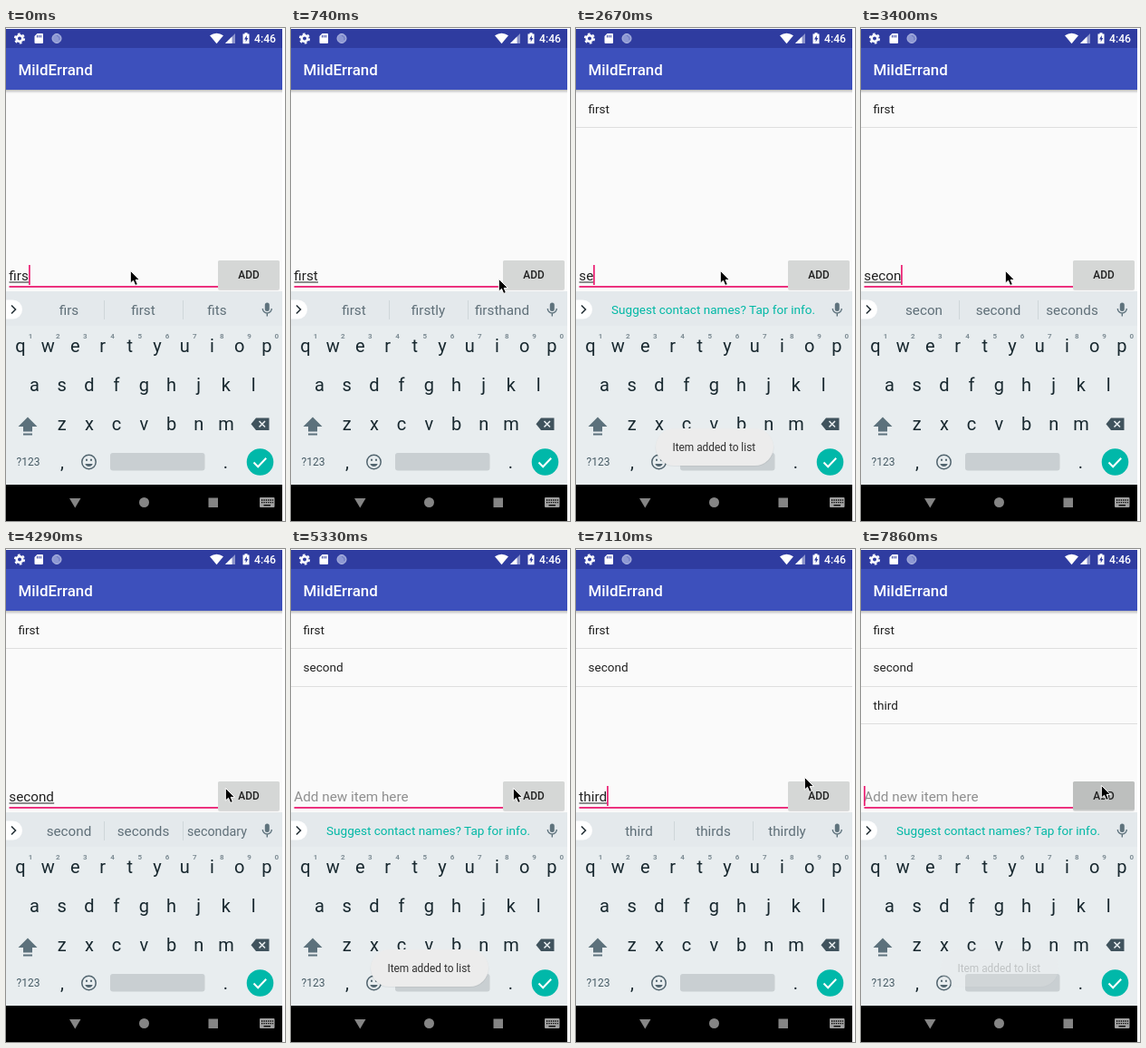
These frames come from a looping animation (308 by 543 pixels, 8 s). An HTML page:

```html
<!DOCTYPE html>
<html lang="en">
<head>
<meta charset="utf-8">
<title>Task list</title>
<style>
  html, body { margin: 0; width: 100%; height: 100%; overflow: hidden; background: #fff; }
  svg { display: block; font-family: Roboto, sans-serif; }
  .mid { text-anchor: middle; }
  .item { font-size: 13.55px; fill: #212121; }
  .field { font-size: 15.25px; }
  .word { font-size: 15.25px; fill: #5f6f78; text-anchor: middle; }
  .key { font-size: 20px; fill: #18282f; text-anchor: middle; }
  .digit { font-size: 8px; font-weight: 700; fill: #7d8c94; text-anchor: middle; }
</style>
</head>
<body>
<svg width="308" height="543" viewBox="0 0 308 543">
  <defs>
    <linearGradient id="shade" x2="0" y2="1">
      <stop offset="0" stop-color="#000" stop-opacity=".25"/>
      <stop offset="1" stop-color="#000" stop-opacity="0"/>
    </linearGradient>
  </defs>

  <!-- App and status bars -->
  <rect y="1" width="305" height="542" fill="#fafafa"/>
  <rect y="1" width="305" height="21" fill="#2f3ca0"/>
  <rect y="22" width="305" height="46" fill="#3d50bc"/>
  <rect y="68" width="305" height="4" fill="url(#shade)"/>
  <text x="13.5" y="51.5" font-size="16.9" font-weight="500" fill="#fff">MildErrand</text>
  <g fill="#fff">
    <circle cx="15" cy="11.5" r="3.3" fill="none" stroke="#fff" stroke-width="2.6"/>
    <circle cx="15" cy="11.5" r="5.2" fill="none" stroke="#fff" stroke-width="1.8" stroke-dasharray="2.7 2.745"/>
    <path d="M34.5 6H40a1 1 0 0 1 1 1v9a1 1 0 0 1-1 1h-7.5a1 1 0 0 1-1-1V9z"/>
    <path d="M34.5 8v2.5M36.5 8v2.5M38.5 8v2.5" stroke="#2f3ca0"/>
    <circle cx="56" cy="11.5" r="5" fill="#8e99d3" stroke="#b3bbe3"/>
    <path d="M56 8.5a3.5 3.5 0 0 1 2.8 4.5" fill="none" stroke="#6b78c2"/>
    <path d="M225 8.3Q232.5 3.2 240 8.3L232.5 17.3z"/>
    <path d="M253 6V17H242z" opacity=".45"/>
    <path d="M249.5 9.5V17H242z"/>
    <path d="M263.5 5.2h3v1.2h2V17.2h-7V6.4h2z"/>
    <path d="M265.8 8l-2.8 4.5h1.7V15.5l2.6-4.5h-1.5z" fill="#2f3ca0"/>
    <text x="274" y="16" font-size="12.2" font-weight="500">4:46</text>
  </g>

  <g id="list"></g>

  <!-- Entry row -->
  <text id="hint" class="field" x="3.3" y="278" fill="#8f8f8f">Add new item here</text>
  <text id="entry" class="field" x="3.3" y="278" fill="#212121"></text>
  <rect id="underline" x="3.5" y="279.5" height="1" fill="#212121"/>
  <rect x="3.5" y="284" width="230.5" height="1.9" fill="#ec2a79"/>
  <rect id="caret" y="261" width="1.8" height="22" fill="#ec2a79"/>
  <rect x="234" y="257" width="68" height="32" rx="2" fill="#000" opacity=".13"/>
  <rect id="button" x="234" y="256" width="68" height="31.5" rx="1.5"/>
  <text class="mid" x="268" y="276" font-size="11.86" font-weight="500" fill="#202020">ADD</text>

  <!-- Keyboard -->
  <rect y="290" width="305" height="213" fill="#e8edef"/>
  <rect y="290" width="305" height="38" fill="#e4e9ec"/>
  <path d="M0 299.5H7.5a10.5 10.5 0 0 1 0 21H0z" fill="#fff"/>
  <path d="M6 305.5l4.5 4.5L6 314.5" fill="none" stroke="#263238" stroke-width="1.6"/>
  <g id="words">
    <path d="M108.5 300v21M195.5 300v21" stroke="#cfd6d9"/>
    <text class="word" x="69.5" y="316"></text>
    <text class="word" x="151.5" y="316"></text>
    <text class="word" x="233" y="316"></text>
  </g>
  <text id="offer" class="mid" x="151.5" y="315" font-size="13.55" fill="#00b8a5">Suggest contact names? Tap for info.</text>
  <rect x="285.8" y="302.5" width="5" height="9.5" rx="2.5" fill="#5f737d"/>
  <path d="M283.3 309a5 5 0 0 0 10 0M288.3 314v3.5" fill="none" stroke="#5f737d" stroke-width="1.4"/>
  <g id="keys"></g>
  <path d="M24 428.5L34.5 439H29v5.5H19V439H13.5zM19 446.5h10v2H19z" fill="#5c717c"/>
  <path d="M276 429.5h14.5v13.5H276l-5.5-6.75z" fill="#40535d"/>
  <path d="M279.5 433l6.5 6.5M286 433l-6.5 6.5" stroke="#e8edef" stroke-width="1.6"/>
  <text class="mid" x="24.5" y="482" font-size="12" fill="#455a64">?123</text>
  <text class="key" x="62" y="485">,</text>
  <text class="key" x="242.5" y="485">.</text>
  <g fill="none" stroke="#52656f" stroke-width="1.5">
    <circle cx="91.5" cy="478" r="7.7"/>
    <path d="M87.3 480a4.5 4.5 0 0 0 8.4 0z" fill="#52656f" stroke="none"/>
    <path d="M88 475.8h2M93 475.8h2" stroke-width="2"/>
  </g>
  <rect x="115" y="468" width="104.5" height="19.5" rx="3" fill="#c9cfd2"/>
  <circle cx="280.5" cy="478" r="14.8" fill="#00b8a9"/>
  <path d="M273.5 478.5l4.7 4.7 9-9.5" fill="none" stroke="#fff" stroke-width="2"/>

  <!-- Navigation bar -->
  <rect y="503" width="305" height="40" fill="#000"/>
  <g fill="#858585">
    <path d="M70 518h12.5L76.25 528.5z"/>
    <circle cx="152.5" cy="522.5" r="5.5"/>
    <rect x="223.5" y="517.5" width="10.5" height="10.5"/>
    <rect x="280" y="517" width="16.5" height="11" rx="1" fill="#a0a0a0"/>
    <path d="M282 520h13M282 522.7h13" stroke="#000" stroke-width="1.3" stroke-dasharray="1.3 1.1"/>
    <path d="M284.5 525.7h7.5" stroke="#000" stroke-width="1.3"/>
  </g>

  <g id="toast">
    <rect x="87.5" y="442" width="131" height="41" rx="20.5" fill="#000" opacity=".05"/>
    <rect x="88" y="441" width="130" height="41" rx="20.5" fill="#ececec"/>
    <text class="mid" x="152.3" y="466" font-size="11.86" fill="#303030">Item added to list</text>
  </g>
  <path id="pointer" d="M-.7-.7V13.2L2.5 10.3 4.7 15.5 7.4 14.4 5.2 9.4H9.5z" fill="#000" stroke="#fff" stroke-width="1"/>
</svg>

<script>
const LOOP = 8000;
const $ = id => document.getElementById(id);

function add(parent, tag, attrs, text = '') {
  const node = document.createElementNS('http://www.w3.org/2000/svg', tag);
  for (const name in attrs) node.setAttribute(name, attrs[name]);
  node.textContent = text;
  return parent.appendChild(node);
}

const KEY_STEP = 30.2;
[['qwertyuiop', 16, 357], ['asdfghjkl', 31.5, 400], ['zxcvbnm', 61.7, 443]].forEach(([row, left, y], r) => {
  [...row].forEach((letter, i) => {
    const x = left + i * KEY_STEP;
    add($('keys'), 'text', { class: 'key', x, y }, letter);
    if (r === 0) add($('keys'), 'text', { class: 'digit', x: x + 11, y: 342 }, (i + 1) % 10);
  });
});

const rows = ['first', 'second', 'third'].map((name, i) => {
  const row = add($('list'), 'g');
  const y = 94 + i * 41.5;
  add(row, 'text', { class: 'item', x: 13.5, y: Math.floor(y) }, name);
  add(row, 'rect', { x: 0, y: Math.ceil(y + 15), width: 305, height: 1, fill: '#dedede' });
  return row;
});

// Each step lists only what changes at that moment (ms).
const steps = [
  [0, { text: 'firs', words: 'firs first fits', caret: 1, items: 0, toast: 0, pressed: 0, at: [138, 268] }],
  [150, { text: 'first', words: 'first firstly firsthand' }],
  [440, { at: [152, 269] }],
  [590, { at: [190, 273] }],
  [740, { at: [230, 277], caret: 0 }],
  [890, { at: [247, 278] }],
  [1040, { pressed: 1 }],
  [1180, { text: '', words: '', items: 1, toast: .35, caret: 1 }],
  [1330, { toast: .8, pressed: 0, at: [236, 276] }],
  [1480, { toast: .97, at: [187, 270] }],
  [1630, { toast: 1, caret: 0, at: [160, 268] }],
  [2080, { caret: 1 }],
  [2370, { text: 's' }],
  [2670, { text: 'se' }],
  [2960, { text: 'sec', words: 'sec second section' }],
  [3110, { text: 'seco', words: 'seco second seconds' }],
  [3260, { text: 'secon', words: 'secon second seconds', toast: .6 }],
  [3400, { toast: 0 }],
  [3550, { text: 'second', words: 'second seconds secondary' }],
  [3850, { at: [175, 267] }],
  [4000, { at: [205, 266] }],
  [4140, { at: [234, 264], caret: 0 }],
  [4290, { at: [243, 264] }],
  [4440, { at: [262, 267], pressed: 1 }],
  [4590, { text: '', words: '', items: 2, toast: .25, caret: 1 }],
  [4740, { toast: .75, pressed: 0 }],
  [4880, { toast: .95, at: [266, 267] }],
  [5030, { toast: 1, at: [262, 266] }],
  [5180, { caret: 0, at: [252, 265] }],
  [5330, { at: [246, 264] }],
  [5780, { text: 't', caret: 1 }],
  [5920, { text: 'th' }],
  [6220, { text: 'thi', words: 'thi this think' }],
  [6520, { text: 'thir', words: 'thir third thirst' }],
  [6820, { text: 'third', words: 'third thirds thirdly', toast: .6 }],
  [6970, { toast: 0, at: [253, 252] }],
  [7120, { at: [264, 244] }],
  [7260, { at: [269, 254] }],
  [7410, { at: [266, 261] }],
  [7710, { text: '', words: '', items: 3, pressed: 1 }],
  [7860, { toast: .22 }]
];

const states = [];
for (const [, change] of steps) states.push({ ...states[states.length - 1], ...change });

const show = (node, on) => { node.style.display = on ? '' : 'none'; };
const wordNodes = [...$('words').querySelectorAll('text')];

function draw({ text, words, caret, items, toast, pressed, at }) {
  $('entry').textContent = text;
  const width = text ? $('entry').getComputedTextLength() : 0;
  show($('hint'), !text);
  $('underline').setAttribute('width', width);
  $('caret').setAttribute('x', Math.floor(3.5 + width));
  show($('caret'), caret);
  show($('words'), words);
  show($('offer'), !words);
  words.split(' ').forEach((word, i) => {
    wordNodes[i].textContent = word;
    wordNodes[i].style.fontSize = word === 'secondary' ? '14.3px' : '';
  });
  rows.forEach((row, i) => show(row, i < items));
  $('toast').setAttribute('opacity', toast);
  $('button').setAttribute('fill', pressed ? '#bdbfbe' : '#d5d7d6');
  $('pointer').setAttribute('transform', `translate(${at})`);
}

const start = performance.now();
let current = -1;
function tick() {
  const time = (performance.now() - start) % LOOP;
  const index = steps.filter(([ms]) => ms <= time).length - 1;
  if (index !== current) draw(states[current = index]);
  requestAnimationFrame(tick);
}
tick();
</script>
</body>
</html>
```
